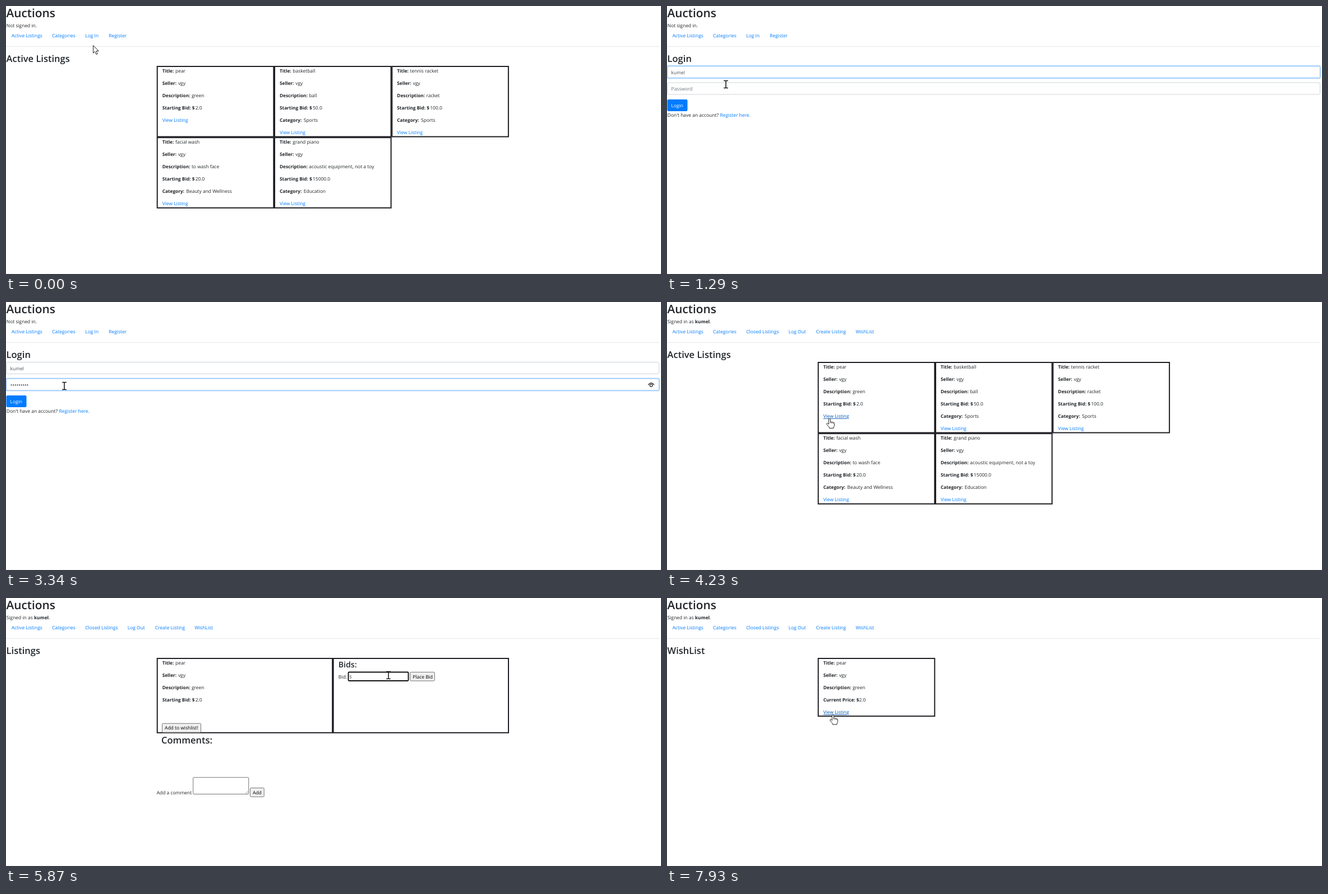
An HTML page that plays this animation: 1168x479 px, repeating every 8 s.

```html
<!DOCTYPE html>
<html lang="en">
<head>
<meta charset="utf-8">
<title>Auctions</title>
<style>
html, body { margin: 0; width: 100%; height: 100%; overflow: hidden; background: #fff; }
svg { display: block; width: 1168px; height: 479px; }
text { font: 8.45px "Open Sans", "Noto Sans", sans-serif; fill: #212529; text-rendering: geometricPrecision; white-space: pre; }
.b { font-size: 8.25px; font-weight: 700; }
.h1 { font-size: 20.8px; font-weight: 600; }
.h2 { font-size: 16.5px; font-weight: 600; }
.h3 { font-size: 14.1px; font-weight: 600; }
.link { fill: #007bff; }
.link.hover { fill: #0056b3; text-decoration: underline; }
.field { fill: #495057; }
.hint { fill: #6c757d; }
.white { fill: #fff; }
.btn { fill: #000; }
</style>
</head>
<body>
<svg id="stage" viewBox="0 0 1168 479"></svg>
<script>
const LOOP = 8000;
const NS = "http://www.w3.org/2000/svg";
const stage = document.getElementById("stage");
const USER = "kumel", SELLER = "vgy";
const INK = "#1e1e24";

function add(parent, tag, attrs = {}, content) {
  const el = document.createElementNS(NS, tag);
  for (const k in attrs) el.setAttribute(k, attrs[k]);
  if (content !== undefined) el.textContent = content;
  parent.appendChild(el);
  return el;
}
const group = (parent = stage) => add(parent, "g");
const text = (p, x, y, s, cls = "") => add(p, "text", { x, y, class: cls }, s);
const box = (p, x, y, width, height, fill, stroke = "none", sw = 1, rx = 0) =>
  add(p, "rect", { x, y, width, height, fill, stroke, "stroke-width": sw, rx });
const show = (el, on) => el.setAttribute("visibility", on ? "visible" : "hidden");
const within = (t, a, b) => t >= a && t < b;

// Bordered panel given by its outer edges
const panel = (p, x, y, w, h) => box(p, x + 1, y + 1, w - 2, h - 2, "none", INK, 2);

const VALUE_X = { "Title:": 23.3, "Seller:": 28.2, "Description:": 52.2,
  "Starting Bid: $": 59, "Current Price: $": 63.8, "Category:": 42.8 };

function facts(p, x, y, rows) {
  rows.forEach(([label, value], i) => {
    text(p, x, y + i * 22, label, "b");
    text(p, x + VALUE_X[label], y + i * 22, value);
  });
}

function details(title, about, price, category, priceLabel = "Starting Bid: $") {
  const rows = [["Title:", title], ["Seller:", SELLER], ["Description:", about], [priceLabel, price]];
  if (category) rows.push(["Category:", category]);
  return rows;
}

function card(p, x, y, h, rows) {
  panel(p, x, y, 209.6, h);
  facts(p, x + 10, y + 12, rows);
  return text(p, x + 10, y + 12 + rows.length * 22, "View Listing", "link");
}

function button(p, x, y, w, h, label) {
  const r = box(p, x, y, w, h, "#efefef", "#767676", 1, 1.5);
  text(p, x + 4.6, y + 11, label, "btn");
  return r;
}

// Shared frame of the site
text(stage, 0.5, 19.6, "Auctions", "h1");
box(stage, 0, 71.8, 1165, 1, "#e6e6e6");
box(stage, 0, 478, 1168, 1, "#f3f3f3");

const NAV_X = [9.7, 82, 141.3, 183.2];
const USER_NAV_X = [9.7, 82, 141.3, 216.8, 265.7, 336.4];
const nav = (p, xs, names) => names.map((s, i) => text(p, xs[i], 55.9, s, "link"));

const outHead = group();
text(outHead, 0.8, 38, "Not signed in.");
const loginLink = nav(outHead, NAV_X, ["Active Listings", "Categories", "Log In", "Register"])[2];

const inHead = group();
text(inHead, 0.8, 38, "Signed in as ");
const who = text(inHead, 50, 38, USER, "b");
add(who, "tspan", { "font-weight": 400 }, ".");
nav(inHead, USER_NAV_X, ["Active Listings", "Categories", "Closed Listings", "Log Out", "Create Listing", "WishList"]);

// All listings
const list = group();
text(list, 0.6, 99.6, "Active Listings", "h2");
const goods = [
  ["pear", "green", "2.0"],
  ["basketball", "ball", "50.0", "Sports"],
  ["tennis racket", "racket", "100.0", "Sports"],
  ["facial wash", "to wash face", "20.0", "Beauty and Wellness"],
  ["grand piano", "acoustic equipment, not a toy", "15000.0", "Education"]
];
const views = goods.map((g, i) =>
  card(list, 268.7 + (i % 3) * 209.3, 107 + Math.floor(i / 3) * 127.2, 127.6, details(...g)));

// Login form
const login = group();
text(login, 0.6, 99.6, "Login", "h2");
function formField(y) {
  const glow = box(login, 0, y - 0.5, 1165, 22, "none", "#bfdeff", 2, 2.5);
  const edge = box(login, 0.5, y, 1164, 21, "#fff", "#ced4da", 1, 2.2);
  return on => {
    show(glow, on);
    edge.setAttribute("stroke", on ? "#80bdff" : "#ced4da");
  };
}
const focusName = formField(107.5), focusPass = formField(137);
const nameText = text(login, 7.6, 121.8, "");
const passHint = text(login, 7.6, 151.2, "Password", "hint");
const dots = Array.from({ length: 9 }, (_, i) =>
  add(login, "circle", { cx: 9.6 + i * 3.6, cy: 148.4, r: 1.15, fill: "#495057" }));
const eye = group(login);
add(eye, "path", { d: "M1145.2 148.4Q1150.5 140.6 1155.8 148.4", fill: "none", stroke: "#222", "stroke-width": 1.2 });
add(eye, "circle", { cx: 1150.5, cy: 148.9, r: 2.3, fill: "none", stroke: "#222", "stroke-width": 1.2 });
const nameCaret = box(login, 8, 112.5, 1, 11.5, "#495057");
const passCaret = box(login, 8, 141.5, 1, 12, "#495057");
box(login, 0.5, 167, 36, 21, "#007bff", "none", 0, 2.2);
text(login, 7.6, 180.6, "Login", "white");
text(login, 0.8, 198, "Don't have an account?");
text(login, 94.5, 198, "Register here.", "link");

// Single listing
const item = group();
text(item, 0.6, 99.6, "Listings", "h2");
panel(item, 268.7, 107, 314.4, 134.8);
panel(item, 582.6, 107, 314.4, 134.8);
facts(item, 278.7, 119, details(...goods[0]));
const wishBtn = button(item, 278.5, 224.2, 69, 16, "Add to wishlist!");
text(item, 592.8, 124.2, "Bids:", "h3");
const placed = group(item);
add(placed, "circle", { cx: 594.9, cy: 139.4, r: 1.5, fill: "#212529" });
text(placed, 605.3, 142.2, USER + ": 5.0");
const bid = group(item);
text(bid, 592.8, 143.8, "Bid:");
const bidBox = box(bid, 610.5, 132.5, 107, 15.5, "#fff", "#767676", 1, 1.5);
const bidText = text(bid, 612.2, 143.6, "$");
const bidCaret = box(bid, 611.5, 135, 1, 11, "#333");
const bidBtn = button(bid, 720.7, 132.5, 43.6, 15.6, "Place Bid");
text(item, 277, 260, "Comments:", "h2");
text(item, 268.7, 350.8, "Add a comment");
box(item, 333.7, 320.7, 99, 29.8, "#fff", "#767676", 1, 1);
add(item, "path", { d: "M427 349.5l4.8 -4.8M429.8 349.5l2 -2", stroke: "#777", "stroke-width": 0.7 });
button(item, 435.4, 339.5, 24.8, 15.8, "Add");

// Wish list
const wish = group();
text(wish, 0.6, 99.6, "WishList", "h2");
const wishView = card(wish, 268.7, 107, 105.2, details("pear", "green", "2.0", "", "Current Price: $"));

// Pointers, each drawn around its hot spot
const pointers = { arrow: group(), hand: group(), beam: group() };
const outline = { fill: "#fff", stroke: "#222", "stroke-width": 1, "stroke-linejoin": "round" };
add(pointers.arrow, "path", { ...outline, d: "M.5 .5V14.2L3.6 11.3L6 16.6L8.3 15.6L6 10.4H10.2Z" });
add(pointers.hand, "path", { ...outline, d:
  "M-1.7 1.8Q-1.7 .3 -.2 .3Q1.3 .3 1.3 1.8V6.4Q2.4 5.5 3.8 6.8Q5.2 6 6.3 7.3Q8.4 7 8.4 9.2V12.2" +
  "Q8.4 14.4 7 16V17.6H-.6V16Q-2.4 14.3 -4.6 11.2Q-6.2 9.2 -4.6 8.5Q-3.4 8.2 -1.7 10.4Z" });
add(pointers.hand, "path", { d: "M1.3 6.4V9M3.8 6.8V9.4M6.3 7.3V9.7", stroke: "#222", "stroke-width": 0.7 });
add(pointers.beam, "path", { d: "M-3.8 -6.6H-1Q0 -6.6 0 -5.6Q0 -6.6 1 -6.6H3.8M0 -6V6M-3.8 6.6H-1Q0 6.6 0 5.6Q0 6.6 1 6.6H3.8",
  fill: "none", stroke: "#111", "stroke-width": 1.5 });

// time, x, y, shape from then on
const track = [
  [0, 155, 70, "arrow"], [30, 155, 70, "arrow"], [100, 153, 55, "hand"], [170, 153, 55, "arrow"],
  [290, 125, 118, "beam"], [1080, 125, 118, "beam"], [1290, 105, 140, "beam"], [1460, 103, 144.5, "beam"],
  [2600, 103, 144.5, "beam"], [2970, 104, 150, "beam"], [3400, 104, 150, "arrow"], [3670, 104, 150, "arrow"],
  [4030, 290, 208, "hand"], [4400, 290, 208, "arrow"], [4960, 320, 232, "hand"], [5050, 330, 230, "arrow"],
  [5300, 682, 138, "beam"], [6200, 682, 138, "arrow"], [6350, 739, 141, "hand"], [6520, 739, 141, "arrow"],
  [6900, 332, 236, "hand"], [7420, 332, 236, "arrow"], [7800, 296, 208.5, "hand"], [LOOP, 296, 208.5, "hand"]
];

function pointerAt(t) {
  let i = 0;
  while (i < track.length - 2 && track[i + 1][0] <= t) i++;
  const [t0, x0, y0, shape] = track[i], [t1, x1, y1] = track[i + 1];
  const u = (t - t0) / (t1 - t0), k = u * u * (3 - 2 * u);
  return { x: x0 + (x1 - x0) * k, y: y0 + (y1 - y0) * k, shape };
}

const keyTimes = [1660, 1690, 1730, 2170, 2290, 2400, 2600, 2760, 2970];
const hover = (el, on) => el.setAttribute("class", on ? "link hover" : "link");
const press = (el, on) => el.setAttribute("fill", on ? "#dedede" : "#efefef");

function draw(t) {
  const onLogin = within(t, 170, 3400), onItem = within(t, 4400, 7420);
  show(outHead, t < 3400);
  show(inHead, t >= 3400);
  const pages = [[list, t < 170 || within(t, 3400, 4400)], [login, onLogin], [item, onItem], [wish, t >= 7420]];
  for (const [page, on] of pages) page.style.display = on ? "" : "none";
  hover(loginLink, within(t, 80, 170));
  hover(views[0], within(t, 4000, 4400));
  hover(wishView, t >= 7740);

  const typed = keyTimes.filter(k => k <= t).length;
  const named = t >= 1080;
  focusName(t < 1460);
  focusPass(t >= 1460);
  nameText.textContent = named ? USER : "Username";
  nameText.setAttribute("class", named ? "field" : "hint");
  show(passHint, !typed);
  show(eye, typed > 0);
  dots.forEach((d, i) => show(d, i < typed));
  show(nameCaret, t < 500 || within(t, 670, 1080));
  show(passCaret, within(t, 1460, 1990) || within(t, 2170, 3110));
  passCaret.setAttribute("x", 8 + typed * 3.6);

  const sent = t >= 6500, filled = within(t, 5940, 6500), focused = within(t, 5370, 6500);
  show(placed, sent);
  bid.setAttribute("transform", `translate(0 ${sent ? 13.1 : 0})`);
  bidBox.setAttribute("stroke", focused ? "#101010" : "#767676");
  bidBox.setAttribute("stroke-width", focused ? 1.9 : 1);
  bidText.textContent = filled ? "5" : "$";
  bidText.style.fill = filled ? "#000" : "#757575";
  show(bidCaret, within(t, 5370, 5870) || within(t, 5940, 6440));
  bidCaret.setAttribute("x", filled ? 617 : 611.5);
  press(bidBtn, within(t, 6310, 6540));
  press(wishBtn, within(t, 4900, 5080) || t >= 6850);

  const p = pointerAt(t);
  for (const k in pointers) show(pointers[k], k === p.shape);
  pointers[p.shape].setAttribute("transform", `translate(${p.x} ${p.y})`);
}

const start = performance.now();
function tick() {
  draw((performance.now() - start) % LOOP);
  requestAnimationFrame(tick);
}
tick();
</script>
</body>
</html>
```
